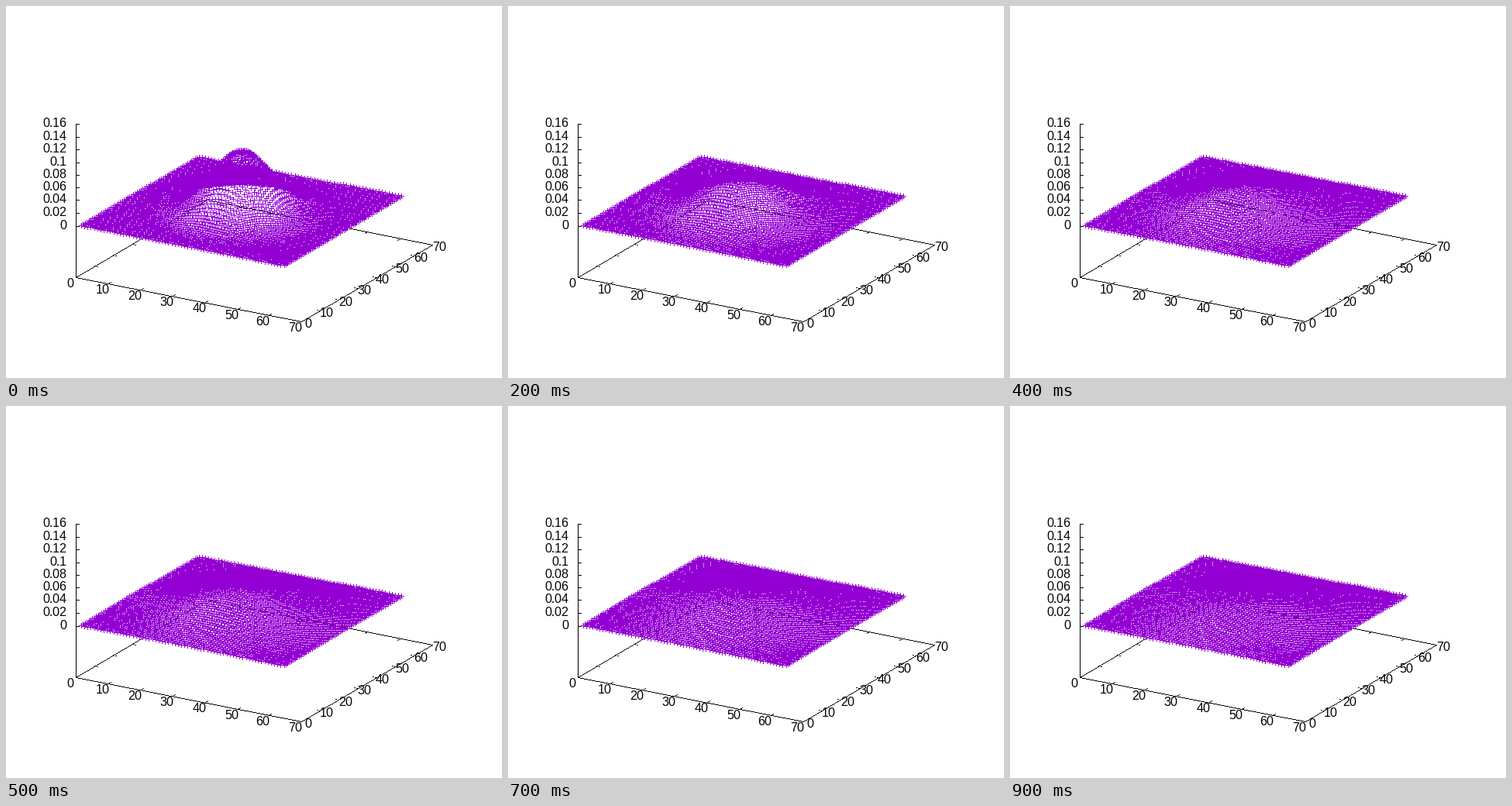
These frames come from a looping animation (640x480 px, 1 s). A matplotlib script:

```python
import matplotlib.pyplot as plt
import numpy as np
from matplotlib.animation import FuncAnimation

WIDTH, HEIGHT, DPI = 640, 480, 100
FRAMES, INTERVAL = 10, 100
BLACK, PURPLE = (0, 0, 0), (148, 0, 211)
GRID = 64
CENTER_X, CENTER_Y = 320, 230
SCALE_X, SCALE_Y = 337, 229
COS30, SIN30 = np.sqrt(3) / 2, 0.5
Z_MIN, Z_MAX = -0.08, 0.16

# Crisp one-pixel stems for the labels.
plt.rcParams.update({"font.family": "Liberation Sans",
                     "text.hinting": "native", "text.hinting_factor": 1})
fig = plt.figure(figsize=(WIDTH / DPI, HEIGHT / DPI), dpi=DPI, facecolor="white")
ax = fig.add_axes([0, 0, 1, 1])
ax.axis("off")


def project(x, y, z=Z_MIN):
    """Column and row of a data point, seen at 60, 30 degrees."""
    x, y = x / 70 - 0.5, y / 70 - 0.5
    z = (z - Z_MIN) / (Z_MAX - Z_MIN) - 0.5
    across = COS30 * x + SIN30 * y
    up = 0.5 * (COS30 * y - SIN30 * x) + COS30 * z
    col = CENTER_X + np.trunc(across * SCALE_X)
    row = CENTER_Y - np.trunc(up * SCALE_Y)
    return np.array([col, row]).astype(int)


def draw_line(pixels, start, end):
    steps = int(np.abs(np.subtract(end, start)).max()) + 1
    cols, rows = np.rint(np.linspace(start, end, steps)).astype(int).T
    pixels[rows, cols] = BLACK


def draw_tick(pixels, start, toward, length=4):
    direction = toward - start
    end = start + length * direction / np.hypot(*direction)
    draw_line(pixels, start, end)


def draw_frame_box():
    pixels = np.full((HEIGHT, WIDTH, 3), 255, np.uint8)
    corners = [project(0, 0), project(70, 0), project(70, 70), project(0, 70)]
    for start, end in zip(corners, corners[1:] + corners[:1]):
        draw_line(pixels, start, end)
    draw_line(pixels, project(0, 0), project(0, 0, Z_MAX))
    for value in range(0, 71, 10):
        front, back = project(value, 0), project(value, 70)
        left, right = project(0, value), project(70, value)
        for start, toward in [(front, back), (back, front), (left, right), (right, left)]:
            draw_tick(pixels, start, toward)
    for step in range(9):
        start = project(0, 0, 0.02 * step)
        draw_line(pixels, start, start + (4, 0))
    return pixels


def label(pos, text, ha="center"):
    ax.text(pos[0], pos[1], text, ha=ha, va="center", size=16 * 72 / DPI)


def draw_labels():
    for value in range(0, 71, 10):
        label(project(value, 0) + (-7.5, 8.5), str(value))
        label(project(70, value) + (9, 3.5), str(value))
    for step in range(9):
        label(project(0, 0, 0.02 * step) + (-12, -0.5), f"{0.02 * step:.2g}", ha="right")


def heat(frame):
    """Spreading Gaussian, held at zero on the walls by mirror images."""
    span = GRID + 1
    u = np.arange(GRID) - (GRID - 1) / 2
    variance = 1.68 + 0.58 * frame
    cell = 10 / span
    profile = sum((-1) ** k * np.exp(-((u - k * span) * cell) ** 2 / (2 * variance))
                  for k in range(-3, 4))
    return np.outer(profile, profile) / (2 * np.pi * variance)


def picture(frame):
    pixels = box.copy()
    i, j = np.mgrid[1:GRID + 1, 1:GRID + 1]
    col, row = project(i, j, heat(frame))
    for arm in range(-3, 4):
        pixels[row, col + arm] = PURPLE
        pixels[row + arm, col] = PURPLE
    return pixels


box = draw_frame_box()
view = ax.imshow(picture(0), extent=(0, WIDTH, HEIGHT, 0), aspect="auto",
                 interpolation="nearest")
draw_labels()


def update(frame):
    view.set_data(picture(frame))
    return [view]


animation = FuncAnimation(fig, update, frames=FRAMES, interval=INTERVAL,
                          repeat=True, repeat_delay=0)
plt.show()
```
